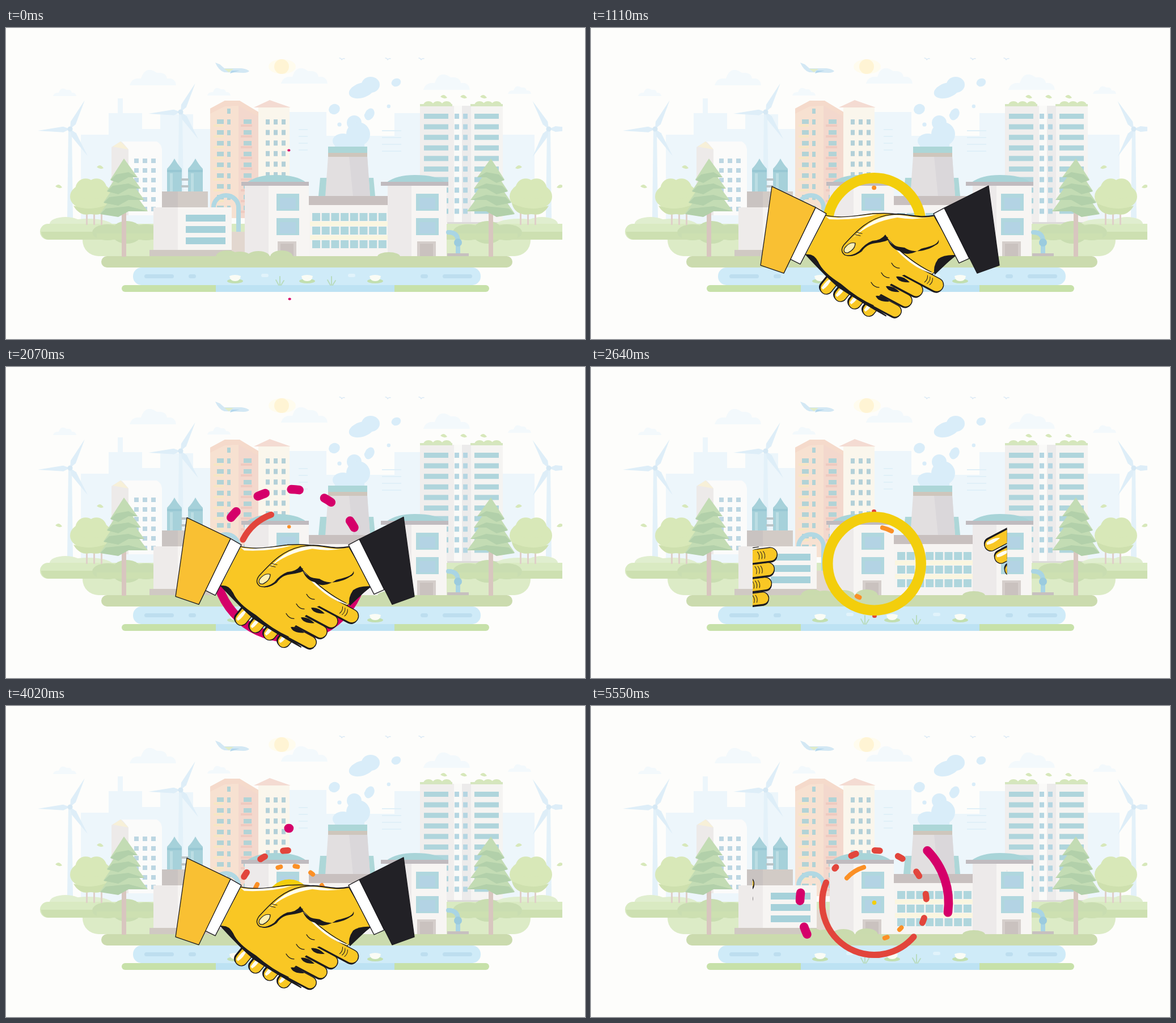
An HTML page with a canvas for the animation above (5580 ms loop, 1021 by 548 pixels).

```html
<!DOCTYPE html>
<html>
<head>
<meta charset="utf-8">
<style>
html, body { margin: 0; width: 100%; height: 100%; overflow: hidden; background: #fdfdfb; }
canvas { display: block; width: 1021px; height: 548px; }
</style>
</head>
<body>
<canvas id="stage" width="1021" height="548"></canvas>
<script>
const W = 1021, H = 548, LOOP = 5580, TAU = 2 * Math.PI;
const stage = document.getElementById('stage').getContext('2d');
const scene = document.createElement('canvas');
scene.width = W;
scene.height = H;
let c = scene.getContext('2d');

// ---------- helpers ----------
function rect(color, x0, y0, x1, y1) {
  c.fillStyle = color;
  c.fillRect(x0, y0, x1 - x0, y1 - y0);
}
function pill(color, x0, y0, x1, y1, r) {
  c.fillStyle = color;
  c.beginPath();
  c.roundRect(x0, y0, x1 - x0, y1 - y0, r);
  c.fill();
}
function oval(color, x, y, rx, ry = rx, rot = 0) {
  c.fillStyle = color;
  c.beginPath();
  c.ellipse(x, y, rx, ry, rot, 0, TAU);
  c.fill();
}
function shape(path, fill, line, width = 1.3) {
  const p = new Path2D(path);
  if (fill) { c.fillStyle = fill; c.fill(p); }
  if (line) {
    c.strokeStyle = line;
    c.lineWidth = width;
    c.lineCap = c.lineJoin = 'round';
    c.stroke(p);
  }
}
function grid(color, x, y, cols, rows, dx, dy, w, h) {
  for (let i = 0; i < cols; i++)
    for (let j = 0; j < rows; j++)
      rect(color, x + i * dx, y + j * dy, x + i * dx + w, y + j * dy + h);
}
function mirrored(axis, draw) {
  draw();
  c.save();
  c.translate(2 * axis, 0);
  c.scale(-1, 1);
  draw();
  c.restore();
}
function seeded(seed) {
  return () => (seed = seed * 16807 % 2147483647) / 2147483647;
}
function ramp(t, start, length) {
  const s = Math.min(1, Math.max(0, (t - start) / length));
  return s * s * (3 - 2 * s);
}

// ---------- city ----------
function cloud(x, y, s) {
  c.save();
  c.translate(x, y);
  c.scale(s, s);
  shape('M-40 0q4-14 20-12q8-24 28-10q16-2 18 10q14-2 16 12z', '#f3f9fc');
  c.restore();
}
function turbine(x, y, foot, turn) {
  shape(`M${x - 3} ${y}L${x + 3} ${y}L${x + 5} ${foot}L${x - 5} ${foot}z`, '#e3f1f9');
  for (let i = 0; i < 3; i++) {
    c.save();
    c.translate(x, y);
    c.rotate(turn + i * TAU / 3);
    shape('M0 0L12-5L57 0L12 5z', '#deeef8');
    c.restore();
  }
  oval('#d5e8f4', x, y, 4.5);
}
function skyline() {
  const haze = '#edf6fb';
  rect(haze, 132, 188, 181, 345);
  rect(haze, 181, 150, 240, 345);
  rect(haze, 197, 124, 206, 150);
  rect(haze, 240, 178, 362, 345);
  rect(haze, 272, 152, 330, 178);
  rect(haze, 500, 148, 565, 345);
  rect(haze, 565, 190, 685, 345);
  rect(haze, 685, 150, 732, 345);
  rect(haze, 872, 188, 932, 345);
  grid('#e0f0f8', 516, 178, 1, 4, 0, 12, 16, 2);
  grid('#e0f0f8', 663, 180, 1, 4, 0, 12, 34, 2);
}
function smoke() {
  const puff = '#d9edf9', rnd = seeded(11);
  oval(puff, 627, 110, 23, 13, -.3);
  oval(puff, 643, 100, 16, 14);
  oval(puff, 688, 96, 8.5, 7, -.4);
  oval(puff, 579, 143, 10, 9, -.4);
  oval(puff, 641, 152, 8, 11, .5);
  oval(puff, 614, 167, 13);
  oval(puff, 621, 187, 21);
  oval(puff, 594, 199, 18, 13);
  rect(puff, 580, 192, 632, 210);
  for (let i = 0; i < 5; i++) oval(puff, 588 + i * 21 + rnd() * 6, 170 - (i * 53 % 90), 2.5 + rnd() * 2.5);
}
function sky() {
  for (const x of [258, 525, 776]) cloud(x, 98 + x % 15, 1);
  for (const x of [103, 375, 905]) cloud(x, 108 + x % 13, .5);
  skyline();
  oval('#fffcee', 487, 68, 24, 13);
  oval('#fff4d4', 486, 68, 13);
  shape('M369 61l8 3 8 7 30 0q10 1 14 5q-3 3-10 3l-34-1q-10-3-16-17z', '#d3e8f4');
  shape('M385 72l16 0 -8 6z', '#e0ecc8');
  shape('M398 75l14 0 -17 5z', '#b3d7ec');
  turbine(113, 178, 335, -1.1);
  turbine(308, 148, 300, -1.1);
  turbine(957, 178, 335, 0);
  for (const x of [592, 673, 732])
    shape(`M${x - 4} 53q3 0 4 3q2-3 5-2`, null, '#dbeaf6', 1.5);
  smoke();
}
function greyHouse() {
  shape('M186 210L202 200L216 207V330H186z', '#edeae9');
  shape('M188 209L202 200L216 214z', '#f7f0d8');
  shape('M204 200H266Q274 204 275 214V330H216V214z', '#fbfbfa');
  grid('#bcd6e2', 226, 230, 3, 6, 15, 17, 8, 8);
}
function peachHouse() {
  const glass = '#b2d3d6';
  shape('M360 142L386 128H410V335H360z', '#f7e1d1');
  shape('M410 128L445 148V335H410z', '#f3d8cd');
  shape('M360 142L386 128H412L445 148V156L410 137L386 138L360 151z', '#f5dacb');
  rect('#faf6ec', 445, 140, 500, 275);
  shape('M437 140L465 127L502 140z', '#f4dbd2');
  grid('#f6e6c4', 366, 170, 1, 9, 0, 19, 18, 4);
  grid('#efcac0', 414, 170, 1, 9, 0, 19, 20, 4);
  grid(glass, 372, 161, 1, 9, 0, 19, 12, 8);
  grid(glass, 390, 142, 1, 10, 0, 19, 6, 9);
  grid(glass, 419, 161, 1, 9, 0, 19, 14, 8);
  grid('#b3d0d8', 458, 161, 3, 6, 14, 18.6, 7, 9);
}
function greenTower() {
  for (let i = 0; i < 3; i++) {
    oval('#d5e7bb', 745 + 16 * i, 136, 9, 7);
    oval('#d5e7bb', 835 + 15 * i, 136, 9, 7);
  }
  rect('#f0eeed', 730, 137, 790, 343);
  rect('#fafaf8', 790, 137, 804, 343);
  rect('#ecebeb', 804, 137, 820, 343);
  rect('#f5f4f2', 820, 137, 876, 343);
  for (const x of [737, 826]) {
    rect('#d5e6bf', x - 7, 134, x + 50, 138);
    grid('#afd5dc', x, 151, 1, 10, 0, 18.6, 43, 9);
  }
  grid('#b5d6e2', 791, 151, 2, 10, 15, 18.6, 8, 9);
  rect('#dcdad9', 778, 342, 878, 346);
}
function roundTree() {
  for (let i = 0; i < 3; i++) rect('#dfd0c8', 141 + 13 * i, 300, 144 + 13 * i, 347);
  oval('#d8e8b8', 151, 297, 37, 26);
  for (let i = 0; i < 6; i++) {
    const a = i * TAU / 6;
    oval('#d8e8b8', 150 + 19 * Math.cos(a), 297 + 16 * Math.sin(a), 18);
  }
  shape('M119 313Q150 325 184 309Q178 332 150 328Q128 331 119 313z', '#cee0ae');
}
function pine() {
  rect('#d8c6bf', 204, 290, 212, 403);
  for (let i = 3; i >= 0; i--) {
    const y = 246 + 20 * i, w = 24 + 6 * i, x = 208;
    shape(`M${x} ${y - 16 - 8 * i}L${x + w} ${y + 17}L${x + w - 14} ${y + 17}L${x + 8} ${y + 13}L${x - 10} ${y + 26}L${x - w} ${y + 21}z`, '#c3dcb4');
    shape(`M${x - w + 10} ${y + 12}L${x + 8} ${y + 8}L${x + w} ${y + 17}L${x + 8} ${y + 17}L${x - 10} ${y + 27}L${x - w} ${y + 22}z`, '#b2d0aa');
  }
}
function ground() {
  mirrored(525, () => {
    oval('#e0eecf', 105, 345, 28, 12);
    oval('#e0eecf', 145, 350, 45, 14);
  });
  pill('#d9eac2', 60, 345, 1000, 373, 14);
  pill('#cde0b1', 62, 359, 1000, 373, [0, 0, 14, 14]);
  pill('#dcebc6', 135, 373, 925, 402, [0, 0, 28, 28]);
  mirrored(531, () => {
    for (let i = -1; i < 2; i++) oval('#c9ddb1', 213 + 34 * i, 360, 27, 20 - 6 * Math.abs(i));
    rect('#cde0b1', 160, 362, 275, 373);
  });
}
function tanks() {
  const teal = '#a6d1da';
  for (const x of [297, 334]) {
    shape(`M${x} 230Q${x + 6} 241 ${x + 13} 248V288H${x - 13}V248Q${x - 6} 241 ${x} 230z`, teal);
    rect('#97c7d3', x - 13, 250, x + 13, 254);
    rect('#bcdde3', x - 8, 256, x - 3, 288);
  }
  grid('#bbc5c8', 309, 265, 1, 2, 0, 12, 13, 4);
  rect('#c9c3c1', 275, 288, 303, 316);
  rect('#d2cbc6', 303, 288, 356, 316);
  shape('M366 320V316A22 21 0 0 1 410 316V362', null, '#b1d8e3', 8);
  rect('#e2d7cf', 398, 359, 421, 402);
  rect('#eeebea', 260, 316, 303, 394);
  rect('#f7f5f3', 303, 316, 398, 394);
  grid(teal, 317, 329, 1, 3, 0, 20, 70, 12);
  rect('#d0c9c3', 253, 391, 398, 402);
}
function chimney() {
  shape('M551 296L554 264H566V296zM636 296V264H648L651 296z', '#add7d8');
  shape('M568 226H637L642 297H563z', '#e2dfe0');
  shape('M605 226H637L642 297H612z', '#dad7da');
  rect('#acd6d7', 568, 209, 637, 221);
  rect('#cec6bc', 568, 220, 637, 227);
}
function factoryWing(x, wall, end) {
  rect('#edeaea', wall, 277, wall + 42, 402);
  rect('#f7f5f3', wall + 42, 277, end, 402);
  shape(`M${x + 4} 272Q${x + 22} 259 ${x + 54} 259Q${x + 92} 259 ${x + 108} 272z`, '#a8d4d8');
  rect('#c0bbbf', x - 6, 271, x + 113, 278);
  grid('#b0d7de', x + 56, 292, 1, 2, 0, 43, 40, 30);
  grid('#b3d3e4', x + 62, 299, 1, 2, 0, 43, 28, 20);
  rect('#d5cecb', x + 58, 376, x + 91, 402);
  rect('#cac2bf', x + 63, 380, x + 86, 402);
}
function factory() {
  tanks();
  chimney();
  rect('#f6f4f2', 530, 310, 690, 402);
  grid('#faf6e0', 536, 341, 1, 2, 0, 24, 140, 8);
  grid('#afd6dd', 540, 326, 8, 3, 16.7, 24, 14, 14);
  rect('#c8c0bf', 532, 296, 685, 312);
  factoryWing(421, 421, 534);
  factoryWing(667, 673, 777);
  shape('M780 360Q797 360 797 376V398', null, '#a9d5e4', 8);
  oval('#9bcbde', 797, 378, 7);
  rect('#c7c0bf', 778, 397, 816, 402);
}
function pond() {
  for (const x of [390, 412, 445, 486, 675]) oval('#cadbae', x, 403, 20, 5 + x % 8);
  pill('#cbdbae', 168, 402, 893, 422, 10);
  pill('#cfebf8', 224, 422, 837, 453, 15);
  pill('#c7e1a9', 204, 453, 852, 465, 6);
  rect('#bde2f3', 370, 453, 685, 465);
  mirrored(533, () => {
    pill('#bddeef', 244, 434, 296, 441, 3.5);
    pill('#bddeef', 322, 434, 335, 441, 3.5);
    pill('#e1f3fb', 450, 433, 463, 439, 3);
  });
  for (const x of [404, 531, 651]) {
    oval('#c2dfb0', x, 446, 14, 4);
    shape(`M${x - 10} 437Q${x} 433 ${x + 10} 437Q${x + 9} 446 ${x} 446Q${x - 9} 446 ${x - 10} 437z`, '#fafcf5');
  }
  for (const x of [483, 574])
    shape(`M${x} 453V438M${x - 2} 453l-5-9M${x + 2} 453l5-8`, null, '#b9dcc0', 2);
}
function leaf(x, y) {
  shape(`M${x - 6} ${y}q6-7 12 2q-6 3-12-2z`, '#d7e8ba');
}
function paintScene() {
  rect('#fdfdfb', 0, 0, W, H);
  c.save();
  c.beginPath();
  c.rect(0, 0, 981, H);
  c.clip();
  sky();
  greyHouse();
  peachHouse();
  greenTower();
  ground();
  mirrored(538, roundTree);
  factory();
  pond();
  mirrored(531.5, pine);
  mirrored(535, () => { leaf(93, 279); leaf(166, 245); });
  for (let i = 0; i < 3; i++) leaf(772 + 35 * i, 121);
  c.restore();
}

// ---------- rings ----------
const CX = 499.5, CY = 346.5, RING_LOOP = 1667, YELLOW = '#f3ce0c';
const DASH_STEP = 26.6 * TAU / 360, TOP = -TAU / 4;

// Each end makes one full turn: the head rushes first, the tail rushes last.
const head = t => .75 * ramp(t, 100, 330) + .25 * ramp(t, 430, 240);
const tail = t => .25 * ramp(t, 80, 400) + .75 * ramp(t, 365, 310);

function sweep(from, to, r, width, color, dash) {
  c.strokeStyle = color;
  c.lineWidth = width;
  c.lineCap = 'round';
  c.setLineDash(dash ? [dash, r * DASH_STEP - dash] : []);
  c.beginPath();
  c.arc(CX, CY, r, from, to, true);
  c.stroke();
  c.setLineDash([]);
}
function orbit(t, r, width, color, dash) {
  if (t < 0 || t > 800) return;
  const a = TAU * tail(t), b = Math.max(TAU * head(t), a + .01);
  const w = width * Math.min(1, .25 + t / 90, .3 + (800 - t) / 80);
  sweep(-TOP - a, -TOP - b, r, w, color, dash);
  sweep(TOP - a, TOP - b, r, w, color);
}
function rings(t) {
  orbit(t, 131, 15.5, '#d5006a', 14);
  orbit(t - 200, 92, 11, '#e2453c', 9);
  orbit(t - 360, 65, 8, '#fb9026', 5);

  const outer = 91.5 * ramp(t, 500, 400) - 19 * ramp(t, 1200, 220);
  const inner = 73 * ramp(t, 620, 300);
  if (outer - inner > .5) {
    const r = (outer + inner) / 2;
    c.strokeStyle = YELLOW;
    c.lineWidth = outer - inner;
    c.beginPath();
    c.arc(CX, CY, r, 0, TAU);
    c.stroke();
  }
  oval(YELLOW, CX, CY, 74 * ramp(t, 1170, 150) * (1 - ramp(t, 1420, 230)));
  if (t > 1150 && t < 1480) {
    const a = Math.PI * ramp(t, 1180, 300), b = Math.PI * ramp(t, 1140, 300);
    for (const s of [TOP, -TOP]) sweep(s - a, s - b, 97, 5, YELLOW);
  }
}

// ---------- handshake ----------
const INK = '#1c1b1f', SKIN = '#f9c724', GLEAM = '#fffdf0', SHAKE_LOOP = 2790, FAR = 1.17;

function posed(e, x, y, dx, dy, turn, draw) {
  c.save();
  c.translate(x + e * dx, y + e * dy);
  c.rotate(e * turn);
  c.translate(-x, -y);
  draw();
  c.restore();
}
function capsule(x, y, angle, length, r, detail) {
  c.save();
  c.translate(x, y);
  c.rotate(angle);
  c.beginPath();
  c.roundRect(-length, -r + 2.5, length + r, 2 * r, r);
  c.fillStyle = INK;
  c.fill();
  c.beginPath();
  c.roundRect(-length, -r, length + r, 2 * r, r);
  c.fillStyle = SKIN;
  c.strokeStyle = INK;
  c.lineWidth = 1.4;
  c.fill();
  c.stroke();
  detail();
  c.restore();
}
function rightBack() {
  for (let i = 3; i >= 0; i--)
    capsule(415 + 25 * i, 459 + 13 * i, 2.25, 62, 11, () => shape('M5 7Q-12 9-20 3Q-5-1 6 3z', GLEAM));
  shape('M604 331C570 338 550 322 520 332L480 400L545 450L600 436L645 400z', SKIN, INK);
  shape('M643 401Q622 400 612 408Q602 422 606 436z', INK);
}
function rightSleeve() {
  shape('M623 318L604 328L649 415L667 407z', '#fff', INK);
  shape('M701 279L623 318L681 433L720 419z', '#222126', INK);
}
function rightThumb() {
  const edge = 'M604 332C575 338 555 325 520 331C490 338 472 354 446 383Q438 394 448 401Q462 405 477 394C488 377 508 378 523 370';
  shape(edge + 'L545 391Q576 400 609 378L620 362z', SKIN);
  shape(edge, null, INK, 1.5);
  shape('M600 334C570 339 555 328 530 331C496 336 480 352 462 371C482 352 508 340 540 335Q570 340 600 334z', GLEAM);
  shape('M447 389Q456 377 466 380Q466 391 453 397Q444 398 447 389z', '#fff0b4', INK, 1.2);
  shape('M466 365L475 367M469 361L478 363', null, INK, 1);
  shape('M450 402Q467 406 479 391C490 377 510 382 525 374L519 365Q512 375 496 376Q483 381 473 394Q462 402 450 402z', INK);
  shape('M523 374C535 388 543 386 553 388C569 399 592 394 607 384Q615 381 613 374C611 384 596 386 582 390C566 401 552 401 545 394Q530 391 523 374z', INK);
}
function knuckleLines() {
  for (let i = 0; i < 3; i++) shape(`M${-22 + 5 * i}-7q4 6 1 13`, null, INK, 1);
}
function leftHand(open) {
  shape('M379 400Q393 400 404 420L500 494L520 508Q480 486 436 457Q412 436 379 400z', INK, INK, 2);
  // The index finger stays stretched while the others curl around.
  for (let i = 3; i >= 0; i--) {
    const reach = i ? 20 * open : 20;
    capsule(592 - 18.5 * i + .88 * reach, 444 + 18.5 * i + .47 * reach, .49, 62 + reach, 12 - .4 * i,
      () => { if (reach > 10) knuckleLines(); });
  }
  shape('M414 331C440 337 470 332 496 328Q530 326 542 330L523 373Q545 400 584 424L541 440L524 457L506 475L498 490Q470 478 440 452Q408 432 400 413Q395 403 379 400z', SKIN);
  shape('M379 400Q395 403 400 413Q408 432 440 452Q470 478 498 490M414 331C440 337 470 332 496 328Q530 326 542 330M523 373C550 400 575 419 600 431', null, INK, 1.5);
  shape('M414 333C440 338 475 331 505 329Q470 340 420 338z', GLEAM);
  shape('M524 374C550 402 580 424 606 434C578 430 545 404 524 374z', GLEAM);
  for (let i = 0; i < 3; i++) {
    const x = 538 - 18 * i, y = 439 + 17 * i;
    shape(`M${x} ${y}q12-2 24 10q-20 1-24-10z`, INK);
    shape(`M${x - 8} ${y - 24}q5 9 14 9`, null, INK, 1.2);
  }
  shape('M379 400Q393 398 400 412Q405 425 417 436Q402 428 379 400z', INK);
}
function leftSleeve() {
  shape('M396 317L415 328L369 417L351 408z', '#fff', INK);
  shape('M319 280L396 317L340 433L299 419z', '#f9c033', INK);
}
function hands(u) {
  const leave = Math.sin(TAU / 4 * Math.min(1, Math.max(0, (u - 2330) / 460)));
  const e = FAR * (1 - ramp(u, 60, 630) + leave);
  if (e > FAR - .002) return;
  const open = 1 - ramp(u, 690, 90) + ramp(u, 2220, 100);
  const bob = -5 + 11 * Math.cos(TAU * (u - 1800) / 690 + 1.187);
  const left = draw => posed(e, 610 - 4 * open, 453, -284, -121, -.6, () => {
    c.translate(-4 * open, 0);
    draw();
  });
  const right = draw => posed(e, 408, 464, 283, -146, .4, draw);
  c.save();
  c.beginPath();
  c.rect(285, 0, 448.5, H);
  c.clip();
  c.translate(0, bob * Math.max(0, 1 - e));
  right(rightBack);
  left(() => { leftHand(open); leftSleeve(); });
  right(() => { rightThumb(); rightSleeve(); });
  c.restore();
}

// ---------- playback ----------
paintScene();
c = stage;
function frame(now) {
  const t = Math.floor((now % LOOP) / 30) * 30;
  c.drawImage(scene, 0, 0);
  rings(t % RING_LOOP);
  hands(t % SHAKE_LOOP);
  requestAnimationFrame(frame);
}
frame(0);
</script>
</body>
</html>
```
